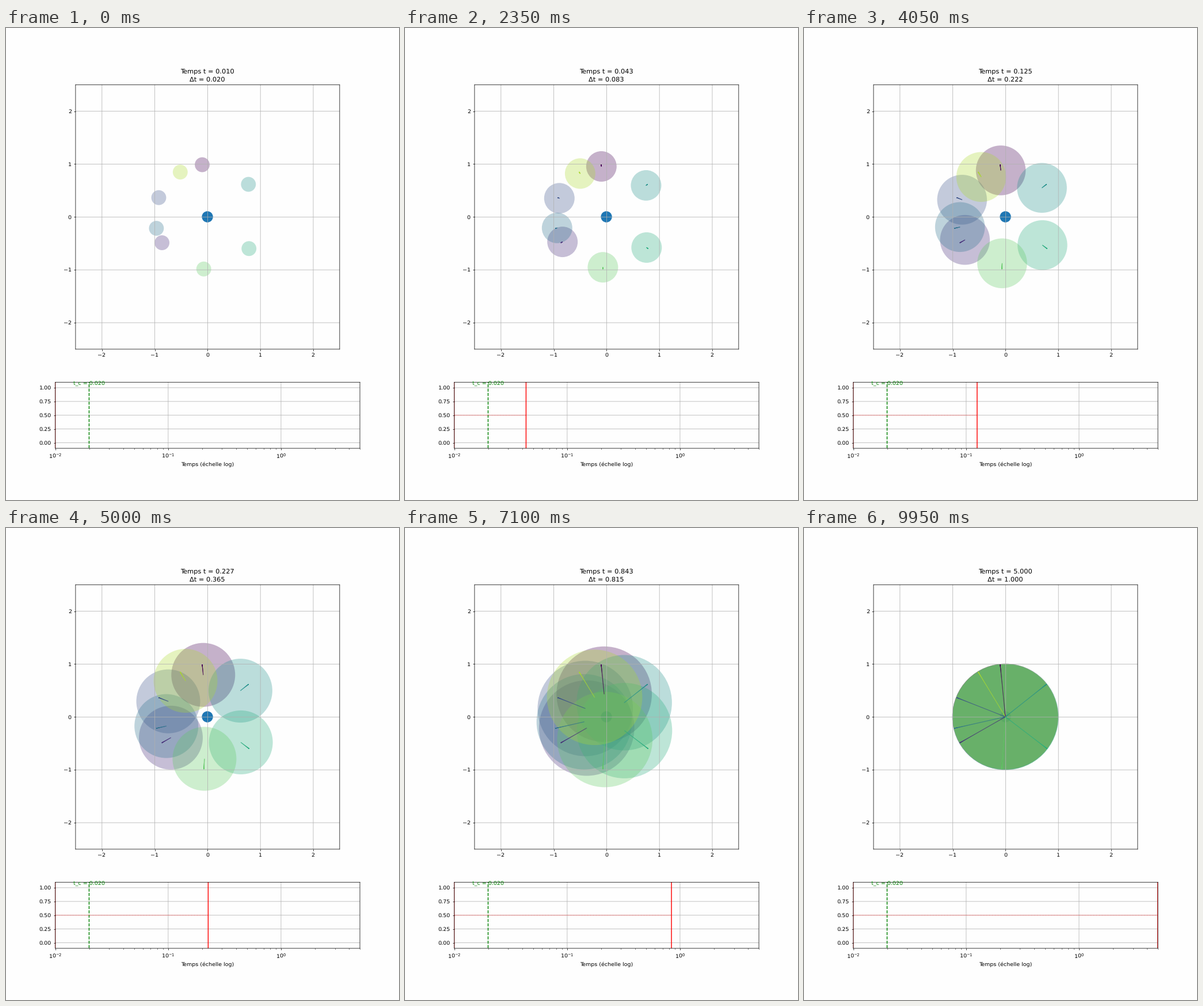
Recreate the animation shown at these times as a matplotlib script. Size 683 by 820 pixels, loop 10000 ms.

```python
import numpy as np
import matplotlib.pyplot as plt
from matplotlib.animation import FuncAnimation
from matplotlib.collections import LineCollection
from matplotlib.patches import Circle
from matplotlib.transforms import Affine2D

DPI = 68.3
WIDTH, HEIGHT = 683, 820
FRAMES, INTERVAL = 200, 50
T_CRIT = 0.02
ANGLES = np.radians([95.7, 209.7, 158.5, 192.7, 38.35, -37.4, 266.0, 121.3])
COUNT = len(ANGLES)
BACKGROUND = "#fefefe"

# Smooth, unsnapped drawing
plt.rcParams.update({"path.snap": False, "text.hinting": "none"})

times = np.geomspace(0.01, 5, FRAMES)
spread = 1 - np.exp(-2 * times)
colors = plt.cm.viridis(np.arange(COUNT) / COUNT)

# positions[frame, particle] = (x, y), decaying towards the origin
start = np.column_stack([np.cos(ANGLES), np.sin(ANGLES)])
positions = np.exp(-times)[:, None, None] * start
steps = np.stack([positions[:-1], positions[1:]], axis=2).reshape(-1, 2, 2)

# Thin lines sit a third of a pixel to the right and down
nudge = Affine2D().translate(0.34, -0.34)


def shift(artist):
    artist.set_transform(artist.get_transform() + nudge)


def shift_frame(axes):
    for spine in axes.spines.values():
        spine.set_transform(spine.get_spine_transform() + nudge)
    for axis in (axes.xaxis, axes.yaxis):
        for line in [*axis.get_gridlines(), *axis.get_ticklines(),
                     *axis.get_ticklines(minor=True)]:
            shift(line)


# The tiny margin keeps the pixel size from being rounded down
fig = plt.figure(figsize=(WIDTH / DPI + 1e-9, HEIGHT / DPI + 1e-9),
                 dpi=DPI, facecolor=BACKGROUND)
ax = fig.add_axes([0.1765, 0.32, 0.672, 0.56], facecolor=BACKGROUND)
ax_time = fig.add_axes([0.125, 0.11, 0.775, 0.14], facecolor=BACKGROUND)

ax.set(xlim=(-2.5, 2.5), ylim=(-2.5, 2.5),
       xticks=range(-2, 3), yticks=range(-2, 3))
ax.grid(True)
ax.add_patch(Circle((0, 0), 0.1, color="C0"))
discs = [ax.add_patch(Circle((0, 0), 0.1, facecolor=c, edgecolor="none", alpha=0.3))
         for c in colors]

# Short overlapping strokes: denser, hence darker, where the motion is slow
trails = LineCollection([], colors=colors, linewidths=1, alpha=0.5,
                        capstyle="projecting", zorder=2)
ax.add_collection(trails, autolim=False)
title = ax.set_title("", linespacing=1.36)

ax_time.set_xscale("log")
ax_time.set(xlim=(0.01, 5), ylim=(-0.1, 1.1), xlabel="Temps (échelle log)",
            yticks=np.linspace(0, 1, 5))
ax_time.yaxis.set_major_formatter("{x:.2f}")
ax_time.grid(True)
origin = ax_time.axvline(times[0], color="red", lw=0.8)
ax_time.axvline(T_CRIT, color="green", ls="--", lw=1.5)
ax_time.text(T_CRIT, 1.05, f"t_c = {T_CRIT:.3f}", color="green", ha="center")
progress, = ax_time.plot([], [], color="red", ls=":", lw=1)
cursor = ax_time.axvline(times[0], color="red", lw=1.5)

shift_frame(ax)
shift_frame(ax_time)
shift(origin)
shift(progress)


def update(n):
    t = times[n]
    for disc, center in zip(discs, positions[n]):
        disc.center = center
        disc.radius = np.sqrt(spread[n])
    trails.set_segments(steps[:n * COUNT])

    label = f"Temps t = {t:.3f}\nΔt = {spread[n]:.3f}"
    if abs(t - T_CRIT) < 5e-4:
        label += "\nt = t_c"
    title.set_text(label)

    progress.set_data([times[0], t], [0.5, 0.5])
    cursor.set_xdata([t, t])
    cursor.set_visible(n > 0)
    return [*discs, trails, title, progress, cursor]


anim = FuncAnimation(fig, update, frames=FRAMES, interval=INTERVAL,
                     init_func=lambda: update(0), repeat=True, repeat_delay=0)
plt.show()
```
